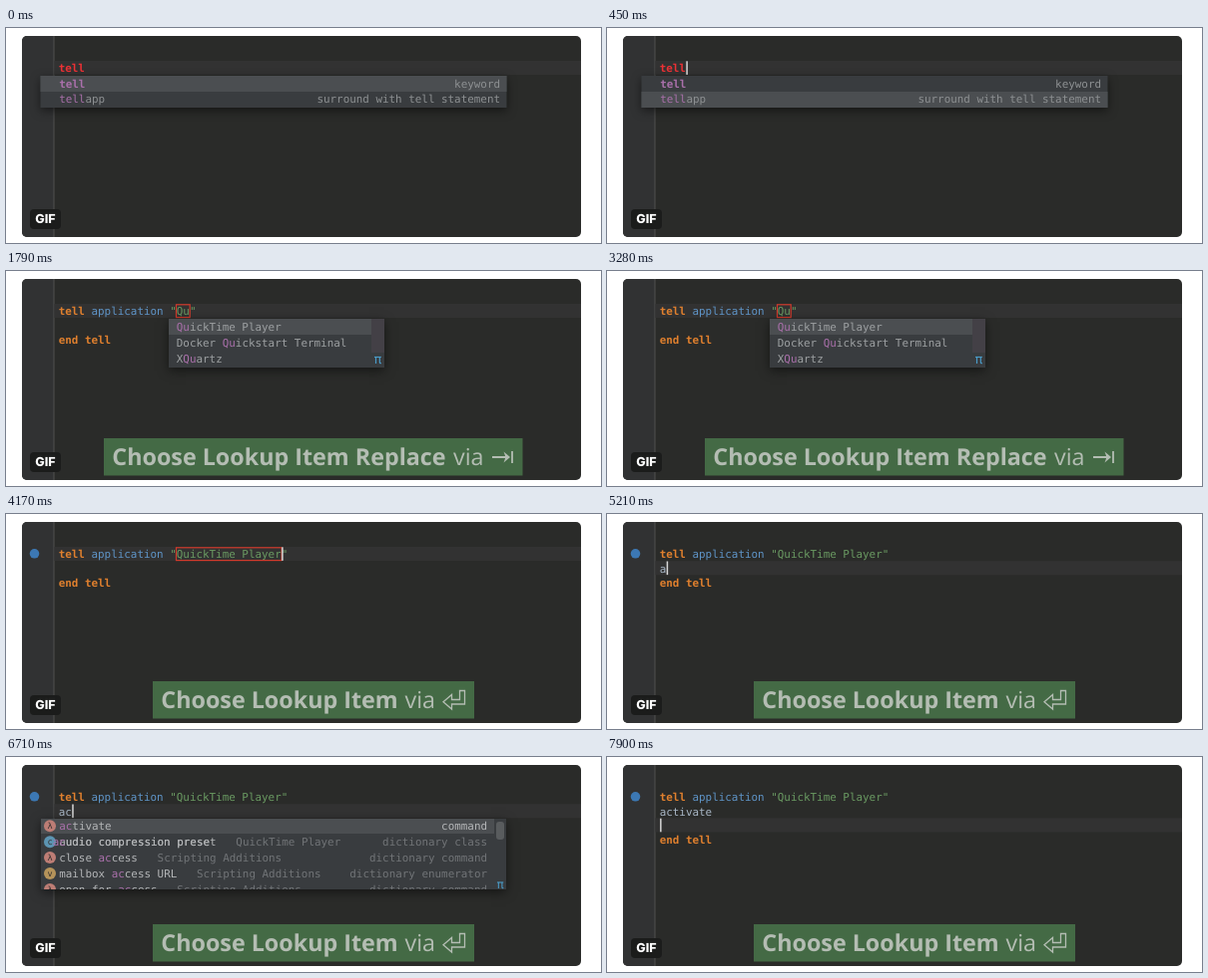
Recreate the animation shown at these times as an HTML page with a canvas. Size 596 by 216 pixels, loop 8 s.

```html
<!DOCTYPE html>
<html lang="en">
<head>
<meta charset="utf-8">
<style>
  html, body { margin: 0; width: 100%; height: 100%; overflow: hidden; background: #fff; }
  canvas { display: block; width: 596px; height: 216px; }
</style>
</head>
<body>
<canvas id="stage"></canvas>
<script>
const W = 596, H = 216, LOOP = 8000;
const canvas = document.getElementById('stage');
const ratio = window.devicePixelRatio || 1;
canvas.width = W * ratio;
canvas.height = H * ratio;
const ctx = canvas.getContext('2d');
ctx.scale(ratio, ratio);
ctx.textRendering = 'geometricPrecision';

const MONO = '10.9px "DejaVu Sans Mono", monospace';
const TITLE = '23.3px "Open Sans", sans-serif';
const CHAR = 6.56, LEFT = 52.7, LINE = 14.2;
const C = {
  keyword: '#e0802e', plain: '#a9b7c6', blue: '#5f95c8', string: '#6a9a62', error: '#ee3135',
  match: '#aa70ab', item: '#b4b6b8', dim: '#717477', muted: '#8d9092',
  popup: '#393c3f', selected: '#4b4e51', pi: '#4a9cc9'
};

function rect(x, y, w, h, color) {
  ctx.fillStyle = color;
  ctx.fillRect(x, y, w, h);
}

function rounded(x, y, w, h, r, color) {
  ctx.fillStyle = color;
  ctx.beginPath();
  ctx.roundRect(x, y, w, h, r);
  ctx.fill();
}

function disc(x, y, r, color) {
  ctx.fillStyle = color;
  ctx.beginPath();
  ctx.arc(x, y, r, 0, 7);
  ctx.fill();
}

function text(s, x, y, color, font = MONO, align = 'left') {
  ctx.font = font;
  ctx.fillStyle = color;
  ctx.textAlign = align;
  ctx.fillText(s, x, y);
}

function shape(points, closed) {
  ctx.beginPath();
  points.forEach(([x, y]) => ctx.lineTo(x, y));
  if (closed) ctx.closePath();
}

const column = n => LEFT + n * CHAR;
const baseline = row => 44.3 + row * LINE;
const code = (s, col, row, color, bold) =>
  text(s, column(col), baseline(row), color, (bold ? 'bold ' : '') + MONO);

function caret(col, row) {
  rect(column(col) + 0.4, 33.3 + row * LINE, 1.5, 13.6, '#d8d8d8');
}

function popupBox(x, y, w, h) {
  ctx.save();
  ctx.shadowColor = 'rgba(0,0,0,.5)';
  ctx.shadowBlur = 10 * ratio;
  ctx.shadowOffsetY = 3 * ratio;
  rect(x, y, w, h, C.popup);
  ctx.restore();
}

// Draws a label with the typed part highlighted wherever it occurs first.
function label(s, typed, x, y, color = C.item, bold = false) {
  const font = (bold ? 'bold ' : '') + MONO;
  const at = s.indexOf(typed), end = at + typed.length;
  text(s.slice(0, at), x, y, color, font);
  text(typed, x + at * CHAR, y, C.match, font);
  text(s.slice(end), x + end * CHAR, y, color, font);
}

function tellPopup(choice) {
  popupBox(34.5, 48, 467, 32);
  rect(34.5, 48 + choice * 16, 467, 16, C.selected);
  label('tell', 'tell', LEFT + 0.5, 59.5, C.item, true);
  text('keyword', 495, 59.5, C.muted, MONO, 'right');
  label('tellapp', 'tell', LEFT + 0.5, 75.3, C.muted);
  text('surround with tell statement', 495, 75.3, C.muted, MONO, 'right');
}

function appPopup(typed) {
  popupBox(163, 48, 216, 49);
  rect(163, 48, 203, 16, C.selected);
  rect(366, 48, 13, 34, '#434046');
  ['QuickTime Player', 'Docker Quickstart Terminal', 'XQuartz'].forEach((name, i) =>
    label(name, typed, 170.8, 59.5 + i * 16, '#9da0a2'));
  text('π', 372.5, 93, C.pi, MONO.replace('10.9', '13'), 'center');
}

const commands = [
  ['λ', '#bd7d75', 'activate', '', 'command'],
  ['c', '#5c94b2', 'audio compression preset', 'QuickTime Player', 'dictionary class'],
  ['λ', '#bd7d75', 'close access', 'Scripting Additions', 'dictionary command'],
  ['v', '#b5935a', 'mailbox access URL', 'Scripting Additions', 'dictionary enumerator'],
  ['λ', '#bd7d75', 'open for access', 'Scripting Additions', 'dictionary command']
];

function commandPopup() {
  popupBox(35, 62, 466, 71);
  ctx.save();
  ctx.beginPath();
  ctx.rect(35, 62, 466, 71);
  ctx.clip();
  rect(35, 62, 454, 15, C.selected);
  commands.forEach(([glyph, tint, name, origin, kind], i) => {
    const y = 73.3 + i * 15.9;
    disc(44, y - 4, 6, tint);
    text(glyph, 44, y - 1.2, '#33302f', MONO.replace('10.9', '8.5'), 'center');
    label(name, 'ac', LEFT + 0.5, y);
    text(origin, LEFT + 0.5 + (name.length + 3) * CHAR, y, C.dim);
    text(kind, 482, y, i ? C.dim : C.item, MONO, 'right');
  });
  rounded(491, 65, 8, 18, 3, '#595c5e');
  text('π', 495, 131.5, C.pi, MONO.replace('10.9', '12'), 'center');
  ctx.restore();
}

function banner(x, w, title, viaX, drawKey) {
  const ink = '#b4bdb3';
  rect(x, 168, w, 37.5, '#446a45');
  text(title, x + 8.3, 195.3, ink, 'bold ' + TITLE);
  text('via', viaX, 195.3, ink, TITLE);
  ctx.strokeStyle = ctx.fillStyle = ink;
  drawKey();
}

function tabBanner() {
  banner(98, 419.5, 'Choose Lookup Item Replace', 448, () => {
    ctx.lineWidth = 1.8;
    shape([[487, 187], [503, 187]]);
    ctx.stroke();
    shape([[507, 181], [507, 193]]);
    ctx.stroke();
    shape([[498.5, 181.5], [505, 187], [498.5, 192.5], [500.5, 187]], true);
    ctx.fill();
  });
}

function enterBanner() {
  banner(147, 322, 'Choose Lookup Item', 399.5, () => {
    ctx.lineWidth = 1.3;
    shape([[454.5, 177.5], [459.5, 177.5], [459.5, 191], [446.5, 191], [446.5, 196],
           [438, 188.7], [446.5, 181.5], [446.5, 186.5], [454.5, 186.5]], true);
    ctx.stroke();
  });
}

function tellBlock(s) {
  const name = s.name || '';
  code('tell', 0, 0, C.keyword, true);
  code('application', 5, 0, s.plain ? C.plain : C.blue);
  code('"' + name + '"', 17, 0, C.string);
  if (s.body) code(s.body, 0, 1, C.plain);
  code('end tell', 0, s.endRow || 2, C.keyword, true);
  if (s.boxed) {
    ctx.strokeStyle = '#d03a2c';
    ctx.lineWidth = 1.2;
    ctx.strokeRect(column(18) - 0.3, 33.8, name.length * CHAR + 0.6, 12.8);
  }
}

// Each scene holds from its start time until the next one begins.
const player = { name: 'QuickTime Player', banner: enterBanner };
const scenes = [
  { at: 0, choice: 0 },
  { at: 300, choice: 1, caret: [4, 0] },
  { at: 750, plain: true, boxed: true, caret: [18, 0], banner: tabBanner },
  { at: 1050, boxed: true, caret: [18, 0], banner: tabBanner },
  { at: 1500, name: 'Q', boxed: true, caret: [19, 0], banner: tabBanner, popup: () => appPopup('Q') },
  { at: 1790, name: 'Qu', boxed: true, banner: tabBanner, popup: () => appPopup('Qu') },
  { at: 3430, ...player, boxed: true, caret: [34, 0] },
  { at: 3730, ...player, boxed: true, caret: [34, 0], icon: true },
  { at: 4470, ...player, caret: [0, 1], icon: true },
  { at: 5210, ...player, body: 'a', caret: [1, 1], icon: true },
  { at: 5510, ...player, body: 'ac', caret: [2, 1], icon: true, popup: commandPopup },
  { at: 7010, ...player, body: 'activate', caret: [8, 1], icon: true },
  { at: 7450, ...player, body: 'activate', caret: [0, 2], icon: true, endRow: 2.98 }
];

function draw(time) {
  const s = scenes.findLast(scene => scene.at <= time);
  rect(0, 0, W, H, '#fff');
  ctx.save();
  ctx.beginPath();
  ctx.roundRect(16, 8, 560, 202, 5);
  ctx.clip();
  rect(16, 8, 560, 202, '#2a2b29');
  rect(16, 8, 32, 202, '#313233');
  rect(47.5, 8, 1, 202, '#505150');
  rect(48.5, 33 + (s.caret ? s.caret[1] : 0) * LINE, 528, 14, '#323232');

  if ('choice' in s) {
    code('tell', 0, 0, C.error, true);
    tellPopup(s.choice);
  } else {
    tellBlock(s);
  }
  if (s.icon) disc(28.5, 39.8, 4.8, '#3c78b4');
  if (s.caret) caret(...s.caret);
  if (s.popup) s.popup();
  if (s.banner) s.banner();

  rounded(24, 182, 31, 20, 4, '#1b1c1b');
  text('GIF', 39.5, 196.4, '#fff', '800 12.5px Inter, sans-serif', 'center');
  ctx.restore();
}

const start = performance.now();
function tick() {
  draw((performance.now() - start) % LOOP);
  requestAnimationFrame(tick);
}
tick();
</script>
</body>
</html>
```
